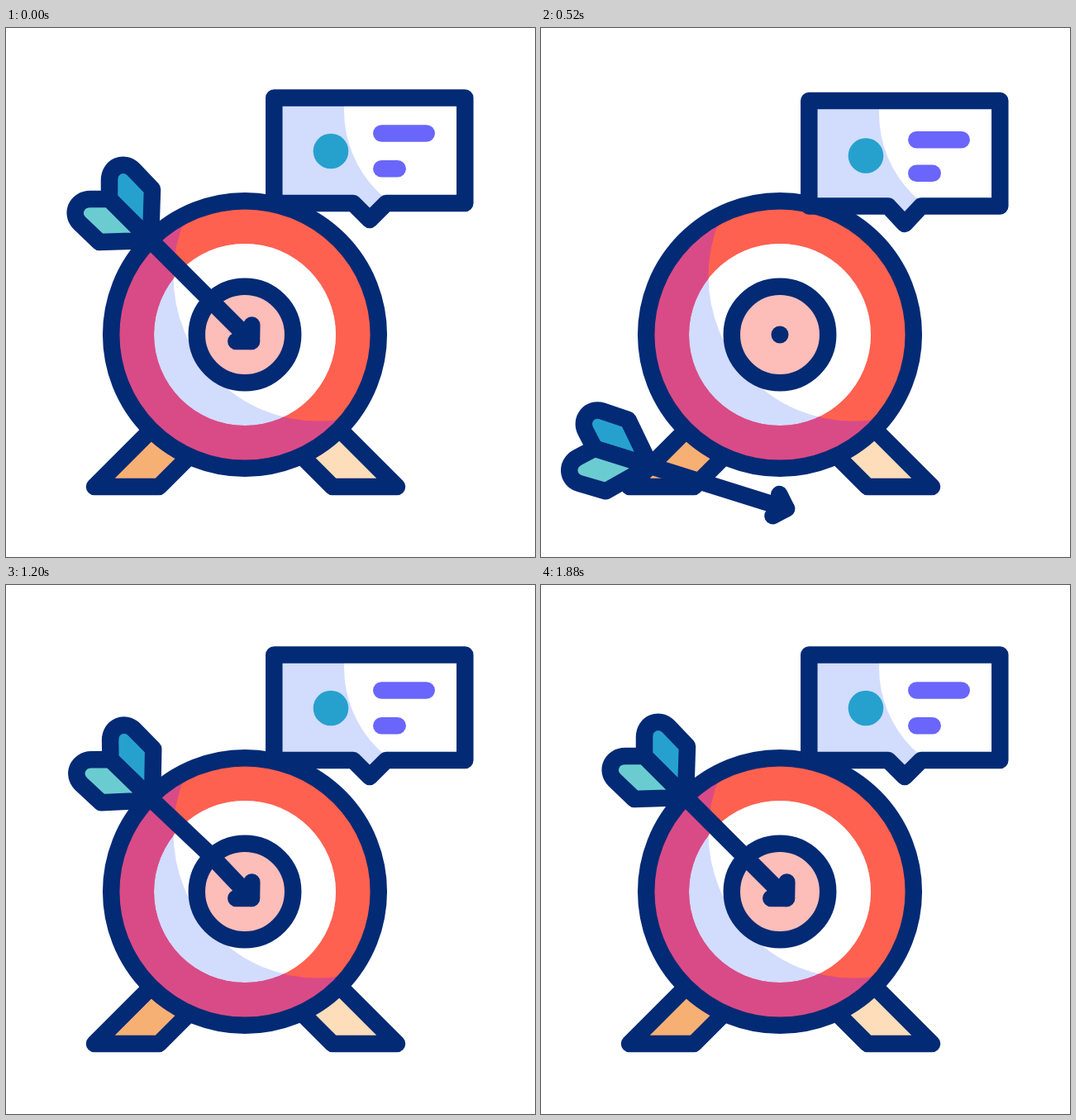
An HTML page with a canvas for the animation above (2 s loop, 640 by 640 pixels).

```html
<!DOCTYPE html>
<html lang="en">
<head>
<meta charset="utf-8">
<title>Target</title>
<style>
  html, body { margin: 0; width: 100%; height: 100%; overflow: hidden; background: #fff; }
  canvas { display: block; width: 640px; height: 640px; }
</style>
</head>
<body>
<canvas id="stage" width="640" height="640"></canvas>
<script>
const ctx = document.getElementById('stage').getContext('2d');
const LOOP = 2000, STEP = 40, RAD = Math.PI / 180;
const NAVY = '#032a75', RED = '#ff6150', PLUM = '#d94b86', MIST = '#d2dcfd',
      ROSE = '#fdbdb9', BLUE = '#26a1cd', AQUA = '#6accd1', VIOLET = '#6a66fb',
      ORANGE = '#f7b074', CREAM = '#fdddba';

const smooth = s => s * s * (3 - 2 * s);
const clamp = s => Math.min(1, Math.max(0, s));

// Eased value from [time, value] pairs
function keyed(t, keys) {
  let [t0, v0] = keys[0];
  for (const [t1, v1] of keys) {
    if (t < t1) return t1 > t0 ? v0 + (v1 - v0) * smooth(clamp((t - t0) / (t1 - t0))) : v0;
    t0 = t1; v0 = v1;
  }
  return v0;
}

function poly(points, closed) {
  const p = new Path2D();
  points.forEach(([x, y], i) => i ? p.lineTo(x, y) : p.moveTo(x, y));
  if (closed) p.closePath();
  return p;
}

function disc(x, y, r) {
  const p = new Path2D();
  p.arc(x, y, r, 0, 7);
  return p;
}

function fill(path, color, rule) {
  ctx.fillStyle = color;
  ctx.fill(path, rule || 'nonzero');
}

function stroke(path, color = NAVY, width = 20.5) {
  ctx.strokeStyle = color;
  ctx.lineWidth = width;
  ctx.stroke(path);
}

const legShape = poly([[107, 555], [185, 555], [235, 505], [190, 472]], true);
const finShape = new Path2D(
  'M125 207 L125 184 C125 167 143 160 154 171 L177 195 L175 257 Z');

function leg(color, mirrored) {
  ctx.save();
  if (mirrored) ctx.transform(-1, 0, 0, 1, 580, 0);
  fill(legShape, color);
  stroke(legShape);
  ctx.restore();
}

function shade(circle, base, dark, area) {
  ctx.save();
  ctx.clip(area);
  fill(area, dark);
  fill(circle, base);
  ctx.restore();
}

function target() {
  const rim = disc(289, 371, 161.8), light = disc(378, 300, 175.5);
  leg(ORANGE, false);
  leg(CREAM, true);
  shade(light, RED, PLUM, rim);
  shade(light, '#fff', MIST, disc(289, 371, 110));
  stroke(rim);
  const eye = disc(289, 371, 58.2);
  fill(eye, ROSE);
  stroke(eye);
  fill(disc(289, 371, 10.5), NAVY);
}

function bubble(t) {
  const d = keyed(t, [[80, 0], [400, 24], [680, -28], [1000, 0]]);
  const down = d > 0;
  const base = 212 + d, tip = 232 + d * (down ? 1.4 : 1.19);
  const box = poly([[324.3, 84.5 + d], [555.3, 84.5 + d], [555.3, base], [460, base],
    [440, tip], [420, base], [324.3, base]], true);
  shade(disc(547, 100 + d, 138), '#fff', MIST, box);
  stroke(box);
  fill(disc(393, 149 + d * 1.55, 21.3), BLUE);
  const y1 = 127.5 + d * (down ? 2.2 : 1.48);
  const y2 = 170.2 + d * (down ? 1.55 : 2.04);
  stroke(poly([[454.3, y1], [508.7, y1]]), VIOLET);
  stroke(poly([[454.3, y2], [473.7, y2]]), VIOLET);
}

// Tip offset, turn in degrees, and bend of the shaft
function arrowPose(t) {
  if (t < 860) {
    const s = smooth(clamp((t - 80) / 840));
    return { x: 0, y: 378 * s, turn: 51.5 * s, bend: 0 };
  }
  const away = Math.max(0, (1120 - t) / 80);
  const bend = keyed(t, [[1120, 0], [1360, 1], [1540, -0.45], [1880, 0]]);
  return { x: -107 * away, y: -92 * away, turn: -6.3 * Math.min(away, 1.6), bend };
}

function fin(color) {
  fill(finShape, color);
  stroke(finShape);
}

function arrow(t) {
  const { x, y, turn, bend } = arrowPose(t);
  const node = [175 + 8 * bend, 257 + 13 * bend];
  ctx.save();
  ctx.translate(297 + x, 379 + y);
  ctx.rotate(-turn * RAD);
  ctx.translate(-297, -379);

  ctx.save();
  ctx.translate(...node);
  ctx.rotate(-3 * bend * RAD);
  ctx.translate(-175, -257);
  fin(BLUE);
  ctx.transform(0, 1, 1, 0, -82, 82);
  fin(AQUA);
  ctx.restore();

  stroke(poly([node, [245 + 5 * bend, 327 - 5 * bend], [297, 379]]));
  stroke(poly([[278.3, 379], [297, 379], [297.3, 359.5]]));
  ctx.restore();
}

const start = performance.now();
function draw() {
  const now = (performance.now() - start) % LOOP;
  const t = Math.floor(now / STEP) * STEP;
  ctx.fillStyle = '#fff';
  ctx.fillRect(0, 0, 640, 640);
  ctx.lineCap = ctx.lineJoin = 'round';
  target();
  bubble(t);
  arrow(t);
  requestAnimationFrame(draw);
}
draw();
</script>
</body>
</html>
```
